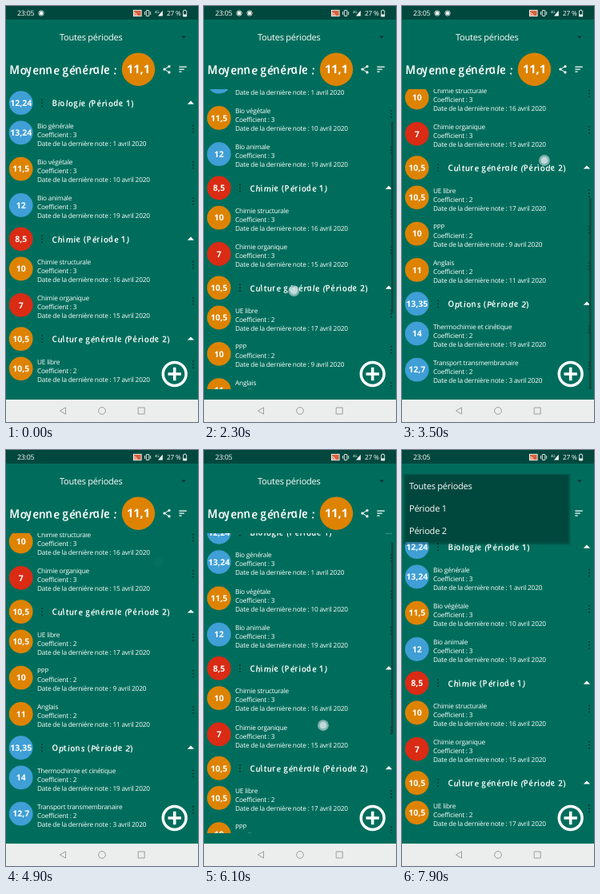
These frames come from a looping animation (240 px wide and 520 px high, 8000 ms). An HTML page:

```html
<!DOCTYPE html>
<html lang="fr">
<head>
<meta charset="utf-8">
<title>Moyennes</title>
<style>
html, body { margin: 0; width: 100%; height: 100%; overflow: hidden; background: #006d5c; }
svg { display: block; width: 100vw; height: 100vh; }
text {
  font-family: "Open Sans", "Noto Sans", sans-serif; fill: #fff; white-space: pre;
  letter-spacing: -0.22px; text-rendering: geometricPrecision;
}
.hand { font-style: italic; font-weight: 600; }
.mark { font-weight: 700; text-anchor: middle; letter-spacing: 0; }
</style>
</head>
<body>
<svg id="stage" viewBox="0 0 240 520" preserveAspectRatio="none">
  <defs><clipPath id="view"><rect y="104" width="240" height="375"/></clipPath></defs>
  <rect width="240" height="520" fill="#006d5c"/>
</svg>
<script>
const LOOP = 8000, TOP = 104, VIEW = 375, MAX = 214;
const BLUE = '#3f9fd6', ORANGE = '#de8300', RED = '#da2b14', DARK = '#00483e';
const stage = document.getElementById('stage');

function add(parent, tag, attrs, content) {
  const node = document.createElementNS('http://www.w3.org/2000/svg', tag);
  for (const key in attrs) node.setAttribute(key, attrs[key]);
  if (content) node.textContent = content;
  parent.appendChild(node);
  return node;
}
const text = (parent, x, y, size, content, extra) =>
  add(parent, 'text', { x, y, 'font-size': size, ...extra }, content);
const path = (parent, d, extra) => add(parent, 'path', { d, fill: 'none', ...extra });
const circle = (parent, cx, cy, r, fill, extra) => add(parent, 'circle', { cx, cy, r, fill, ...extra });

// Upright italic with slightly tilted letters, for a handwritten look.
function hand(parent, x, y, size, spacing, content) {
  const tilt = [...content].map((c, i) => Math.round(7 * Math.sin(i * 2.3))).join(' ');
  add(parent, 'text', {
    class: 'hand', 'font-size': size, rotate: tilt, style: `letter-spacing:${spacing}px`,
    transform: `translate(${x} ${y}) skewX(11)`
  }, content);
}
function badge(parent, x, y, r, size, value, color) {
  circle(parent, x, y, r, color);
  text(parent, x, y + size * 0.36, size, value, { class: 'mark' });
}
function dots(parent, x, y) {
  for (const d of [-4, 0, 4]) circle(parent, x, y + d, 0.95, '#02302a');
}

// Scrolling list
const list = add(add(stage, 'g', { 'clip-path': 'url(#view)' }), 'g', {});
const groups = [
  ['Biologie (Période 1)', '12,24', BLUE, [
    ['Bio générale', '13,24', BLUE, 3, '1 avril'],
    ['Bio végétale', '11,5', ORANGE, 3, '10 avril'],
    ['Bio animale', '12', BLUE, 3, '19 avril']]],
  ['Chimie (Période 1)', '8,5', RED, [
    ['Chimie structurale', '10', ORANGE, 3, '16 avril'],
    ['Chimie organique', '7', RED, 3, '15 avril']]],
  ['Culture générale (Période 2)', '10,5', ORANGE, [
    ['UE libre', '10,5', ORANGE, 2, '17 avril'],
    ['PPP', '10', ORANGE, 2, '9 avril'],
    ['Anglais', '11', ORANGE, 2, '11 avril']]],
  ['Options (Période 2)', '13,35', BLUE, [
    ['Thermochimie et cinétique', '14', BLUE, 2, '19 avril'],
    ['Transport transmembranaire', '12,7', BLUE, 2, '3 avril']]]
];
let rowY = 121.2;
for (const [title, mean, color, rows] of groups) {
  badge(list, 18.7, rowY, 14.9, 10.5, mean, color);
  dots(list, 45, rowY);
  hand(list, 58, rowY + 4.2, 10.6, 0.48, title);
  path(list, `M226.8 ${rowY + 1.5}l4.2-4.2 4.2 4.2z`, { fill: '#fff' });
  rowY += 37.2;
  for (const [name, note, tint, coef, date] of rows) {
    badge(list, 18.7, rowY, 14.9, 10.5, note, tint);
    text(list, 39, rowY - 5.8, 8.3, name);
    text(list, 39, rowY + 5.2, 8.3, `Coefficient : ${coef}`);
    text(list, 39, rowY + 16.2, 8.3, `Date de la dernière note : ${date} 2020`);
    dots(list, 234, rowY - 5);
    rowY += 45.3;
  }
  rowY -= 3;
}
const bar = add(stage, 'rect', { x: 234, width: 2.6, height: 239, fill: '#17473f' });

// Header
text(stage, 67, 42.8, 11, 'Toutes périodes');
path(stage, 'M219 37.5h6l-3 3z', { fill: '#00342d' });
hand(stage, 5, 85.2, 15, 0.05, 'Moyenne générale :');
badge(stage, 165.5, 79.2, 20.7, 14.6, '11,1', ORANGE);
path(stage, 'M204 75.5l-6 3.6 6 3.8', { stroke: '#fff', 'stroke-width': 1 });
for (const [x, y] of [[204, 75.5], [198, 79.1], [204, 82.9]]) circle(stage, x, y, 1.6, '#fff');
path(stage, 'M216.4 76.2h9.4M216.4 79.2h6.4M216.4 82.2h3.2', { stroke: '#fff', 'stroke-width': 1.2 });

// Add button
circle(stage, 210.7, 460, 14.4, '#006d5c', { stroke: '#fff', 'stroke-width': 3.5 });
path(stage, 'M202.5 460h16.4M210.7 451.8v16.4', { stroke: '#fff', 'stroke-width': 3.6 });

// Period menu
const menu = add(stage, 'g', {});
for (const grow of [3, 2, 1]) {
  add(menu, 'rect', {
    x: 4 - grow, y: 32 - grow, width: 204 + 2 * grow, height: 84 + 2 * grow,
    rx: grow, fill: '#000', opacity: 0.09
  });
}
add(menu, 'rect', { x: 4, y: 31, width: 204, height: 84, fill: DARK });
['Toutes périodes', 'Période 1', 'Période 2'].forEach((label, i) =>
  text(menu, 9, 48.8 + 28 * i, 11, label));

// Status bar
add(stage, 'rect', { width: 240, height: 17, fill: DARK });
text(stage, 14, 12, 8.8, '23:05');
const rec = [44, 57].map(x => {
  const g = add(stage, 'g', {});
  circle(g, x, 9, 3.2, 'none', { stroke: '#fff', 'stroke-width': 0.8 });
  circle(g, x, 9, 2.2, '#fff');
  return g;
});
add(stage, 'rect', { x: 159.5, y: 5.3, width: 9.6, height: 7.4, fill: '#d8603c', stroke: '#fff', 'stroke-width': 0.9 });
path(stage, 'M160 8.5a4 4 0 0 1 4 4M160 10.4a2 2 0 0 1 2 2', { stroke: '#fff', 'stroke-width': 0.8 });
add(stage, 'rect', { x: 175.3, y: 5.5, width: 3.6, height: 7, rx: 0.6, fill: 'none', stroke: '#fff', 'stroke-width': 0.9 });
path(stage, 'M173.5 7v4M180.7 7v4', { stroke: '#fff', 'stroke-width': 0.8 });
text(stage, 186, 9, 4.5, '4G');
path(stage, 'M190 12.5h5.8v-6.8z', { fill: '#fff' });
text(stage, 201, 12, 8.3, '27 %');
path(stage, 'M221.5 6h1.2v-1h1.8v1h1.2v7h-4.2z', { stroke: '#fff', 'stroke-width': 0.8 });
add(stage, 'rect', { x: 221.5, y: 10.5, width: 4.2, height: 2.5, fill: '#fff' });

// Navigation bar
add(stage, 'rect', { y: 492, width: 240, height: 28, fill: '#eceeed' });
const grey = { stroke: '#949494', 'stroke-width': 0.9 };
path(stage, 'M74.5 501.8v8.4l-7-4.2z', grey);
circle(stage, 120, 506, 4.4, 'none', grey);
path(stage, 'M165.2 502h8v8h-8z', grey);

const finger = add(stage, 'g', {});
circle(finger, 0, 0, 6.9, '#b4d0d2', { opacity: 0.7 });
circle(finger, 0, 0, 4.4, '#d5e6e8', { opacity: 0.75 });

// Touch paths as [time, x, y]
const up = [[1850, 92, 426], [2800, 135, 279], [3500, 178, 193], [3650, 179, 191]];
const down = [[4900, 191, 140], [5400, 185, 213], [6100, 149, 344], [6350, 139, 378]];
const tap = [[7350, 106, 40], [7520, 106, 40]];

const clamp = (v, lo = 0, hi = 1) => Math.min(hi, Math.max(lo, v));
// Fades in at a and out after b.
const pulse = (t, a, b, rise, fall) => Math.min(clamp((t - a) / rise), clamp(1 - (t - b) / fall));

function along(track, t) {
  t = clamp(t, track[0][0], track[track.length - 1][0]);
  let i = 1;
  while (i < track.length - 1 && t > track[i][0]) i++;
  const a = track[i - 1], b = track[i], k = (t - a[0]) / (b[0] - a[0]);
  return [a[1] + (b[1] - a[1]) * k, a[2] + (b[2] - a[2]) * k];
}

function draw(t) {
  const scroll = t < 4500
    ? clamp(420 - along(up, t)[1], 0, MAX)
    : clamp(362.5 - along(down, t)[1], 0, MAX);
  list.setAttribute('transform', `translate(0 ${-scroll})`);
  bar.setAttribute('y', TOP + scroll * VIEW / (VIEW + MAX));
  bar.setAttribute('opacity', Math.max(pulse(t, 1900, 3900, 60, 250), pulse(t, 4980, 6600, 60, 250)));

  const track = t < 4500 ? up : t < 7000 ? down : tap;
  const [x, y] = along(track, t);
  finger.setAttribute('transform', `translate(${x} ${y})`);
  finger.setAttribute('opacity', pulse(t, track[0][0], track[track.length - 1][0], 40, 80));

  rec[0].setAttribute('opacity', t < 4200 ? 1 : 0);
  rec[1].setAttribute('opacity', t >= 300 && t < 4200 ? 1 : 0);
  menu.setAttribute('opacity', clamp((t - 7500) / 150));
}

function tick() {
  draw(performance.now() % LOOP);
  requestAnimationFrame(tick);
}
tick();
</script>
</body>
</html>
```
